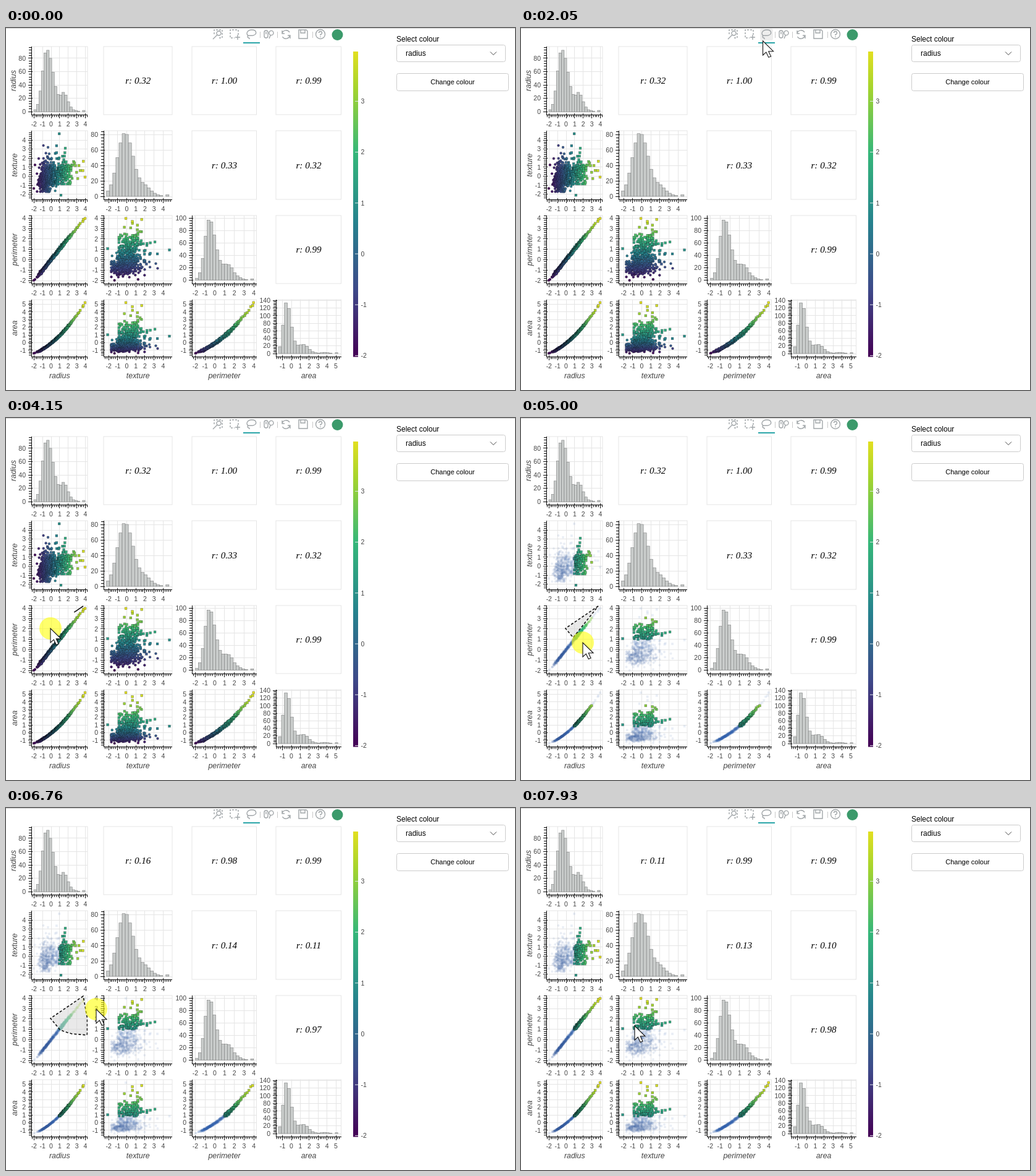
Animation, 824 px wide and 585 px high, one loop 8 s. Source, as an HTML page:

```html
<!DOCTYPE html>
<html lang="en">
<head>
<meta charset="utf-8">
<title>Linked brushing</title>
<style>
html, body { margin: 0; width: 100%; height: 100%; overflow: hidden; background: #fff; }
svg { display: block; font-family: "Liberation Sans", Arial, sans-serif; }
.tick { font-size: 10.5px; fill: #444; }
.title { font-size: 12.4px; font-style: italic; fill: #444; text-anchor: middle; }
.corr { font: italic 15.2px "Liberation Serif", "Times New Roman", serif; text-anchor: middle; }
.pt { stroke: #111; stroke-width: .5; stroke-opacity: .5; }
.dim { fill: #3c62a8; fill-opacity: .11; }
.soft { fill-opacity: .42; }
.icon { fill: none; stroke: #a1a6a9; stroke-width: 1.4; }
.crisp { shape-rendering: crispEdges; }
</style>
</head>
<body>
<svg id="stage" width="824" height="585" viewBox="0 0 824 585"></svg>
<script>
const NS = 'http://www.w3.org/2000/svg';
const stage = document.getElementById('stage');

function add(tag, attrs, parent = stage, text) {
  const el = document.createElementNS(NS, tag);
  for (const k in attrs) el.setAttribute(k, attrs[k]);
  if (text !== undefined) el.textContent = text;
  parent.appendChild(el);
  return el;
}
const label = (x, y, s, cls, extra) => add('text', { x, y, class: cls, ...extra }, stage, s);
const line = (d, stroke, extra) => add('path', { d, stroke, fill: 'none', ...extra });
const crisp = { class: 'crisp' };
const clamp = (v, lo, hi) => Math.max(lo, Math.min(hi, v));

// ---- colours ----
const ramp = ['440154', '3e4989', '26828e', '35b779', 'a5d42e', 'e2df20']
  .map(h => [0, 2, 4].map(i => parseInt(h.substr(i, 2), 16)));
const stops = [0, .22, .44, .67, .88, 1];
function colour(r) {
  const t = clamp((r + 2.02) / 5.99, 0, 1);
  const i = Math.max(1, stops.findIndex(s => s >= t));
  const u = (t - stops[i - 1]) / (stops[i] - stops[i - 1]);
  return `rgb(${ramp[i - 1].map((c, j) => Math.round(c + (ramp[i][j] - c) * u))})`;
}

// ---- data: groups of samples with a sparse upper tail ----
let seed = 20;
function rnd() {
  seed = (seed * 1664525 + 1013904223) % 4294967296;
  return (seed + .5) / 4294967296;
}
const gauss = () => Math.sqrt(-2 * Math.log(rnd())) * Math.cos(2 * Math.PI * rnd());

// values follow names: radius, texture, perimeter, area
function sample(r, t, square) {
  const p = clamp(r + .07 * gauss() + (square ? .04 : -.01), -1.98, 3.97);
  const a = (Math.PI * (14.127 + 3.524 * r) ** 2 - 654.9) / 351.9 + .04 * gauss();
  return { v: [r, t, p, a], square, fill: colour(r) };
}
function group(n, mean, dev, texture, square) {
  return Array.from({ length: n }, () => {
    const g = clamp(gauss(), -2, 2.7);
    return sample(mean + dev * clamp(gauss(), -2.6, 2.6), texture + .86 * (g + .12 * (g * g - 1)), square);
  });
}
const data = [
  ...group(352, -.56, .5, -.3, false),
  ...group(90, .4, .4, .4, true),
  ...group(105, 1.5, .38, .55, true),
  ...Array.from({ length: 12 }, (_, i) => sample(2.3 + 1.1 * (i / 11) ** 1.5, .7 + .7 * gauss(), true)),
  ...[[.95, 4.7], [1.66, 3.1], [1.15, -2.1], [3.71, .62], [3.77, 1.65], [3.97, -.1]].map(q => sample(...q, true)),
  ...[[-.9, 3.4], [-.36, 3.2], [-1.88, 1.25], [-2.02, -1.35]].map(q => sample(...q, false))
].sort((a, b) => a.v[0] - b.v[0]);

// ---- layout: a..b is the frame, o the zero position, k pixels per unit ----
const names = ['radius', 'texture', 'perimeter', 'area'];
const cols = [
  { a: 41, b: 132, o: 73, k: 13.85 }, { a: 158, b: 269, o: 195.5, k: 14.7 },
  { a: 301, b: 405.5, o: 338, k: 15.8 }, { a: 437, b: 542.5, o: 462, k: 14.4 }];
const rows = [
  { a: 30, b: 140 }, { a: 166, b: 277, o: 239.5, k: -14.6 },
  { a: 303, b: 413, o: 374.5, k: -16.8 }, { a: 439, b: 531, o: 508.5, k: -12.4 }];
const mid = ax => (ax.a + ax.b) / 2;

// bumps: height, centre bin, spread to the left and right
const hists = [
  { o: 135.3, k: -1.08, lo: -2.02, hi: 3.97, bumps: [[93, 4.6, 1.75, 2.5], [26, 11.4, 1.4, 1.4]] },
  { o: 272, k: -1.25, lo: -2.23, hi: 4.65, bumps: [[82, 5.4, 2.4, 2.7], [11, 12, 1.5, 1.5]] },
  { o: 407.5, k: -1, lo: -1.98, hi: 3.97, bumps: [[99, 4.3, 1.6, 2.1], [25, 10.7, 2.1, 1.8]] },
  { o: 526, k: -.611, lo: -1.45, hi: 5.25, bumps: [[136, 2.2, 1.1, 1.5], [24, 7.8, 2, 1.8]] }];
const BINS = 20;
function count(h, q) {
  if (q === BINS - 1) return 2;
  return Math.round([...h.bumps, [2.5, 15, 1.5, 1.5]].reduce(
    (sum, [top, c, l, r]) => sum + top * Math.exp(-(((q - c) / (q < c ? l : r)) ** 2) / 2), 0));
}

function ticks(ax, step) {
  const out = [];
  for (let i = step === 1 ? -15 : 0; i <= 45; i++) {
    const p = ax.o + ax.k * i * step / 5;
    if (p > ax.a + .5 && p < ax.b - .5) out.push({ v: Math.round(i * step / 5), p, major: i % 5 === 0 });
  }
  return out;
}

const marks = [], corrs = [];
function panel(i, j) {
  const c = cols[j], r = rows[i];
  const box = { x: c.a, y: r.a, width: c.b - c.a, height: r.b - r.a };
  if (j > i) {
    add('rect', { ...box, fill: '#fff', stroke: '#e5e5e5' });
    corrs.push(label(mid(c) + .3, mid(r) + 5, '', 'corr'));
    return;
  }
  const h = i === j && hists[i];
  const xs = ticks(c, 1), ys = ticks(h ? { ...r, o: h.o, k: h.k } : r, h ? 20 : 1);
  const big = a => a.filter(t => t.major);
  line(big(xs).map(t => `M${t.p} ${r.a}V${r.b}`).join('') + big(ys).map(t => `M${c.a} ${t.p}H${c.b}`).join(''), '#e5e5e5', crisp);
  add('rect', { ...box, fill: 'none', stroke: '#e5e5e5' });

  if (h) {
    const width = (h.hi - h.lo) * c.k / BINS;
    for (let q = 0; q < BINS; q++) {
      const height = -h.k * count(h, q);
      if (height) add('rect', {
        x: c.o + h.lo * c.k + q * width, y: h.o - height, width, height,
        fill: '#c9cccb', stroke: '#7d7f7f', 'stroke-width': .6
      });
    }
  } else {
    const id = `clip${i}${j}`;
    add('rect', box, add('clipPath', { id }));
    const g = add('g', { 'clip-path': `url(#${id})` });
    for (const d of data) {
      const x = c.o + c.k * d.v[j], y = r.o + r.k * d.v[i], fill = d.fill;
      const el = d.square
        ? add('rect', { x: x - 1.9, y: y - 1.9, width: 3.8, height: 3.8, fill }, g)
        : add('circle', { cx: x, cy: y, r: 1.95, fill }, g);
      marks.push({ el, d, col: j, lassoed: i === 2 && j === 0 });
    }
  }

  const out = t => t.major ? 5.5 : 3.6, inn = t => t.major ? 2 : 0;
  line(`M${c.a} ${r.a}V${r.b}H${c.b}` +
    xs.map(t => `M${t.p} ${r.b + out(t)}V${r.b - inn(t)}`).join('') +
    ys.map(t => `M${c.a - out(t)} ${t.p}H${c.a + inn(t)}`).join(''), '#111', crisp);
  for (const t of big(xs)) label(t.p, r.b + 19, t.v, 'tick', { 'text-anchor': 'middle' });
  for (const t of big(ys)) label(c.a - 9, t.p + 3.7, t.v, 'tick', { 'text-anchor': 'end' });
}
names.forEach((s, i) => {
  names.forEach((_, j) => panel(i, j));
  label(mid(cols[i]) + .3, 566, s, 'title');
  const x = i ? 18 : 15.5, y = mid(rows[i]);
  label(x, y, s, 'title', { transform: `rotate(-90 ${x} ${y})` });
});

// ---- colour bar ----
const grad = add('linearGradient', { id: 'bar', x1: 0, y1: 1, x2: 0, y2: 0 });
stops.forEach((offset, i) => add('stop', { offset, 'stop-color': `rgb(${ramp[i]})` }, grad));
add('rect', { x: 562, y: 38, width: 8, height: 493.5, fill: 'url(#bar)' });
for (let v = -2; v < 4; v++) {
  const y = 365 - 82.2 * v;
  line(`M565 ${y}H570`, '#dfe6e6');
  label(574.5, y + 3.7, v, 'tick');
}

// ---- toolbar ----
line('M0 .5H824', '#d0d0d0');
const hover = add('rect', { x: 387, y: 1, width: 21, height: 19, rx: 3, fill: '#eee' });
const icon = (d, extra) => add('path', { d, class: 'icon', ...extra });
const dashed = { 'stroke-dasharray': '3 2' };
icon('M337 10V3H350V16H345', dashed);
icon('M348 8.5A3.500 3.500 0 1 1 341 8.5A3.500 3.500 0 1 1 348 8.5M342 11L335 18');
icon('M376 11V3H363V16H370', dashed);
icon('M375 11V19M371 15H379');
icon('M393 13C387 9 391 3 398 3C406 3 407 10 400 12C395 13 391 11 391 14C391 17 395 15 394 18');
icon('M418 7A3 3 0 0 1 424 7V13A3 3 0 0 1 418 13ZM421 6V10M433 8A3.600 3.600 0 1 1 425.800 8A3.600 3.600 0 1 1 433 8M428 12L426 17');
icon('M447 9A6.500 6.500 0 0 1 459 7M459.500 12A6.500 6.500 0 0 1 447.500 14M447 4V9H451M460 17V12H456');
icon('M474 3H486L488 5V17H474ZM477 3V8H484V3');
icon('M516.500 10A7.500 7.500 0 1 1 501.500 10A7.500 7.500 0 1 1 516.500 10M506.500 8A2.500 2.500 0 1 1 509 10.500V12M509 13.500V15');
line('M411.5 6V16M439.5 6V16M496.5 6V16', '#c9c9c9');
add('rect', { x: 384, y: 23, width: 27, height: 2, fill: '#2aa5a8' });
add('circle', { cx: 536.5, cy: 11, r: 9, fill: '#3b9a6b' });

// ---- side controls ----
const field = (y, width, height) =>
  add('rect', { x: 632.5, y, width, height, rx: 3, fill: '#fff', stroke: '#ccc' });
field(27.5, 176, 27);
field(73.5, 181, 28);
label(632, 22, 'Select colour', '', { 'font-size': 12 });
label(647, 45, 'radius', '', { 'font-size': 12 });
label(723, 91, 'Change colour', '', { 'font-size': 11, 'text-anchor': 'middle' });
line('M784 38.5L789 43.5L794 38.5', '#444');

// ---- pointer and lasso ----
const lasso = add('path', {
  fill: '#d3d3d3', 'fill-opacity': .5, stroke: '#111', 'stroke-width': 1.6,
  'stroke-dasharray': '4 3', 'clip-path': 'url(#clip20)'
});
const press = add('circle', { r: 18, fill: '#ff0', 'fill-opacity': .58 });
const pointer = add('path', {
  d: 'M0 0V23L5.300 18.200L9.300 26.500L13 25L9.300 16.800H17Z',
  fill: '#fff', stroke: '#111', 'stroke-width': 1.1
});

// pointer stops: time, x, y
const track = [[1090, 711, 433], [1410, 695, 131], [1640, 695, 131], [2050, 392, 21], [2180, 330, 7],
  [2430, 196, 118], [2960, 117, 378], [3300, 126, 321], [3650, 125, 304], [3860, 125, 304], [4150, 72, 340],
  [4350, 72, 340], [4850, 88, 359], [5000, 100, 363], [5400, 107, 365], [5880, 132, 367], [6400, 150, 345],
  [6760, 146, 325], [7370, 146, 326], [7930, 184, 352]];
const PRESS = 3700, SELECT = 4850, RELEASE = 7000, SETTLE = 7540, LAG = 200;

// correlations before, during and after the selection
const corrText = ['0.32 1.00 0.99 0.33 0.32 0.99', '0.16 0.98 0.99 0.14 0.11 0.97', '0.11 0.99 0.99 0.13 0.10 0.98']
  .map(s => s.split(' '));
const corrStage = (t, k) => t >= 7300 + 110 * k ? 2 : t >= 6130 + 60 * k ? 1 : 0;

function along(t) {
  const i = track.findIndex(k => k[0] > t);
  if (i < 0) return track[track.length - 1].slice(1);
  const [ta, xa, ya] = track[i - 1], [tb, xb, yb] = track[i], u = (t - ta) / (tb - ta);
  return [xa + (xb - xa) * u, ya + (yb - ya) * u];
}

function lassoPath(t) {
  const pts = [];
  for (let s = PRESS; s <= t - LAG; s += 80) {
    const [x, y] = along(s);
    pts.push(`${Math.min(x, 131.5)} ${y}`);
  }
  return pts.length > 1 ? `M${pts.join('L')}Z` : '';
}
const show = (el, on) => el.setAttribute('visibility', on ? 'visible' : 'hidden');

let lastKey = '';
function paintMarks(t) {
  const active = t >= SELECT, held = t < RELEASE;
  // the lasso takes in larger radii as it closes
  const limit = clamp(Math.round(30 + (t - 5000) / 100) / 10, 2.5, 3.85);
  const key = [active, active && limit, held, t >= SETTLE].join();
  if (key === lastKey) return;
  lastKey = key;
  for (const { el, d, col, lassoed } of marks) {
    const top = t >= SETTLE || (!held && col === 0) ? 9 : limit;
    const on = !active || (d.v[0] > .95 && d.v[2] > .97 && d.v[0] < top);
    el.setAttribute('class', !on ? 'dim' : active && lassoed && held ? 'soft' : 'pt');
  }
}

function draw(t) {
  paintMarks(t);
  corrs.forEach((el, k) => {
    const s = 'r: ' + corrText[corrStage(t, k)][k];
    if (el.textContent !== s) el.textContent = s;
  });
  const moving = t >= track[0][0], held = t >= PRESS && t < RELEASE;
  show(pointer, moving);
  show(press, held);
  show(hover, t >= 1990 && t < 2120);
  if (moving) {
    const at = `translate(${along(t)})`;
    pointer.setAttribute('transform', at);
    press.setAttribute('transform', at);
  }
  lasso.setAttribute('d', held ? lassoPath(t) : '');
}

const start = performance.now();
function loop() {
  draw((performance.now() - start) % 8000);
  requestAnimationFrame(loop);
}
loop();
</script>
</body>
</html>
```
